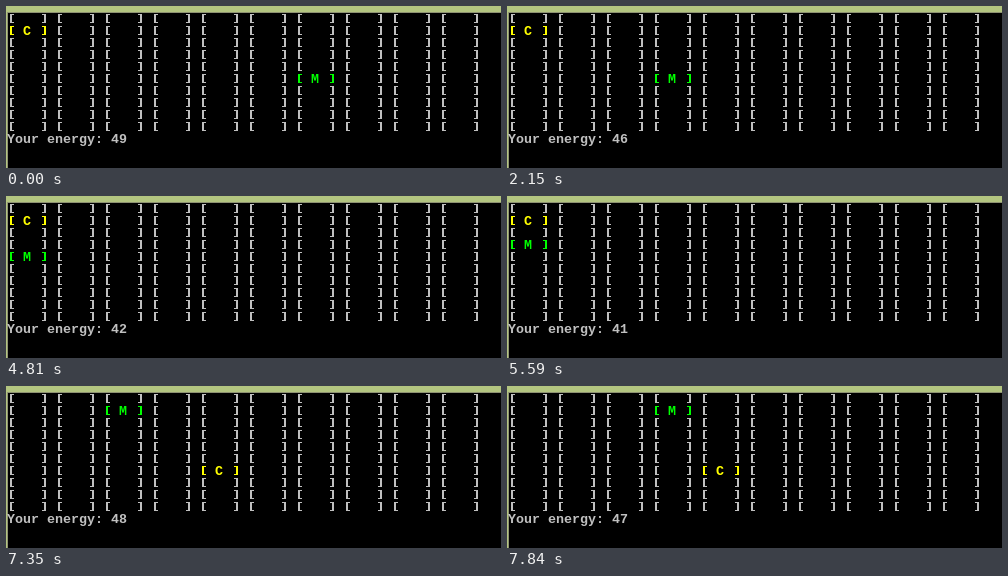
Animation of 495x162 px, one loop 8000 ms. Source, as an HTML page:

```html
<!DOCTYPE html>
<html lang="en">
<head>
<meta charset="utf-8">
<title>Console grid</title>
<style>
  html, body { margin: 0; width: 100%; height: 100%; overflow: hidden; background: #000; }
  svg { display: block; }
  path, rect { shape-rendering: crispEdges; }
  text { font: bold 13.33px "Liberation Mono", monospace; white-space: pre; }
</style>
</head>
<body>
<svg width="495" height="162" viewBox="0 0 495 162">
  <rect width="495" height="162" fill="#b3c580"/>
  <rect x="1" y="6" width="494" height="156" fill="#8e9272"/>
  <rect x="2" y="7" width="493" height="155" fill="#000"/>
  <path id="grid" fill="#c0c0c0"/>
  <g id="food" fill="#ff0"><path/><text>C</text></g>
  <g id="mover" fill="#0f0"><path/><text>M</text></g>
  <text id="energy" x="1" y="137" fill="#c0c0c0"></text>
  <rect id="cursor" x="2" y="148" width="8" height="3" fill="#c0c0c0"/>
</svg>
<script>
const LOOP = 8000, SIZE = 10;
const START = { col: 6, row: 5, energy: 49 };
const FOOD_ROW = 1, FULL = 50;
const MEAL = START.col + START.row - FOOD_ROW;   // step that reaches the food
const REDRAW = 120, DRAWN = 33;                  // the last turn is caught half drawn

// Key presses: uneven at first, then a held key repeats
const KEY_REPEAT = 370;
const presses = [370, 1370, 2150, 2770, 3510, 4010, 4810, 5590, 6240];
while (presses.at(-1) + KEY_REPEAT < LOOP) presses.push(presses.at(-1) + KEY_REPEAT);
const blinks = [250, 1870, 3390];

const $ = id => document.getElementById(id);
const show = (el, on) => el.setAttribute("visibility", on ? "visible" : "hidden");

// Left to the wall, up to the food, then right
function moverAt(step) {
  return {
    col: step < MEAL ? Math.max(0, START.col - step) : step - MEAL,
    row: START.row - Math.min(Math.max(0, step - START.col), START.row - FOOD_ROW),
    energy: step < MEAL ? START.energy - step : FULL - (step - MEAL)
  };
}

const brackets = (col, row) =>
  `M${4 + 48 * col} ${8 + 12 * row}h4v1h-2v7h2v1h-4z` +
  "m32 0h4v9h-4v-1h2v-7h-2z";

const gridPath = count => Array.from({ length: count },
  (_, i) => brackets(i % SIZE, Math.floor(i / SIZE))).join("");

function place(el, col, row) {
  const [path, label] = el.children;
  path.setAttribute("d", brackets(col, row));
  label.setAttribute("x", 17 + 48 * col);
  label.setAttribute("y", 17 + 12 * row);
}

function render(t) {
  const step = presses.filter(press => press <= t).length;
  const lastPress = presses[step - 1] ?? 0;
  const { col, row, energy } = moverAt(step);
  const partial = step === presses.length && t < lastPress + REDRAW;

  $("grid").setAttribute("d", gridPath(partial ? DRAWN : SIZE * SIZE));
  place($("mover"), col, row);
  if (step < MEAL) place($("food"), 0, FOOD_ROW);
  else place($("food"), 4, 6);
  show($("food"), !partial);
  $("energy").textContent = partial ? "" : `Your energy: ${energy}`;
  // a blink lasts until the next key press
  show($("cursor"), blinks.some(blink => blink <= t && blink > lastPress));
}

const start = performance.now();
function tick() {
  render((performance.now() - start) % LOOP);
  requestAnimationFrame(tick);
}
tick();
</script>
</body>
</html>
```
